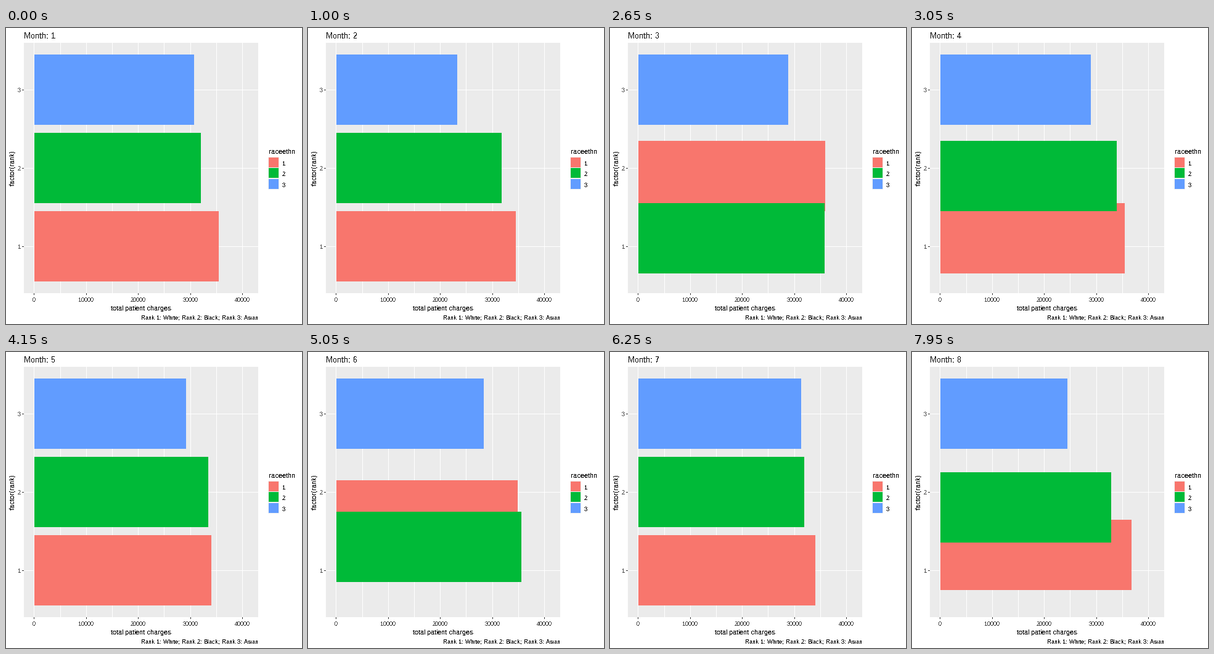
These frames come from a looping animation (480 px wide and 480 px high, 8000 ms). A matplotlib script:

```python
import matplotlib.pyplot as plt
from matplotlib.animation import FuncAnimation
from matplotlib.patches import Rectangle

plt.rcParams.update({
    "font.family": "Liberation Sans",
    "text.hinting": "native",
    "text.hinting_factor": 1,
    "text.antialiased": False,
})

SIZE, DPI = 480, 72
INTERVAL, FRAMES = 50, 160
CYCLE, TWEEN, FIRST_HOLD = 21, 10, 10

COLORS = ["#F8766D", "#00BA38", "#619CFF"]
GROUPS = len(COLORS)
# Monthly totals per group, in the order of COLORS.
CHARGES = [
    (35400, 32000, 30690), (34480, 31750, 23220), (35950, 36020, 28790),
    (35430, 33650, 28910), (34000, 33410, 29150), (35190, 36430, 27960),
    (34000, 31870, 31280), (36970, 31990, 23220), (35780, 36140, 29150),
]
X0, PX_PER_CHARGE = 45.9, 84.4 / 10000
BAR_HEIGHT, RANK_STEP, RANK1_Y = 114, 127, 354
PANEL = (29, 24, 409, 430)

fig = plt.figure(figsize=(SIZE / DPI, SIZE / DPI), dpi=DPI, facecolor="white")
ax = fig.add_axes([0, 0, 1, 1])
ax.set(xlim=(0, SIZE), ylim=(SIZE, 0))
ax.axis("off")


def box(x, y, w, h, color, z=1):
    return ax.add_patch(Rectangle((x, y), w, h, facecolor=color, linewidth=0,
                                  antialiased=False, zorder=z))


def label(x, y, text, size, color="black", ha="left", **kw):
    return ax.text(x, y, text, fontsize=size, color=color, ha=ha,
                   va=kw.pop("va", "baseline"), zorder=5, **kw)


def x_pos(charge):
    return int(X0 + charge * PX_PER_CHARGE)


def y_pos(rank):
    return RANK1_Y - RANK_STEP * (rank - 1)


def draw_panel():
    left, top, right, bottom = PANEL
    box(left, top, right - left, bottom - top, "#EBEBEB", 0)
    for charge in range(5000, 40000, 10000):
        box(x_pos(charge), top, 1, bottom - top, "white")
    for charge in range(0, 50000, 10000):
        x = x_pos(charge)
        box(x, top, 1, bottom - top, "white")
        box(x, bottom, 1, 3, "#333333")
        label(x, 444, str(charge), 9, "#4D4D4D", "center")
    for rank in range(1, GROUPS + 1):
        y = y_pos(rank)
        box(left, y, right - left, 1, "white")
        box(left - 3, y, 3, 1, "#333333")
        label(24, y + 4, str(rank), 9, "#4D4D4D", "right")


def draw_legend():
    label(426, 204, "raceethn", 11)
    box(425, 209, 18, 53, "#F2F2F2")
    for i, color in enumerate(COLORS):
        y = (210, 227, 245)[i]
        box(426, y, 16, 16, color, 2)
        label(448, y + 13, str(i + 1), 9)


draw_panel()
draw_legend()
label(219, 458, "total patient charges", 11, ha="center")
label(16, 227, "factor(rank)", 11, ha="right", va="center", rotation=90)
label(409, 473, "Rank 1: White; Rank 2: Black; Rank 3: Asian", 9, ha="right")
title = label(29, 17, "", 13)
bars = [box(46, 0, 0, BAR_HEIGHT, c, 3 + i / 10) for i, c in enumerate(COLORS)]


def ranks(values):
    return [1 + sum(other > v for other in values) for v in values]


def update(frame):
    month, step = divmod(frame - FIRST_HOLD, CYCLE)
    p = min(step / TWEEN, 1)
    start, end = CHARGES[month], CHARGES[month + 1]

    def mix(a, b):
        return a + (b - a) * p

    for bar, v0, v1, r0, r1 in zip(bars, start, end, ranks(start), ranks(end)):
        bar.set_width(round(X0 + mix(v0, v1) * PX_PER_CHARGE) - 46)
        bar.set_y(round(y_pos(mix(r0, r1))) - BAR_HEIGHT // 2)
    title.set_text(f"Month: {month + (2 if p >= 0.5 else 1)}")
    return [*bars, title]


anim = FuncAnimation(fig, update, frames=FRAMES, interval=INTERVAL,
                     repeat=True, repeat_delay=0, blit=False)
plt.show()
```
